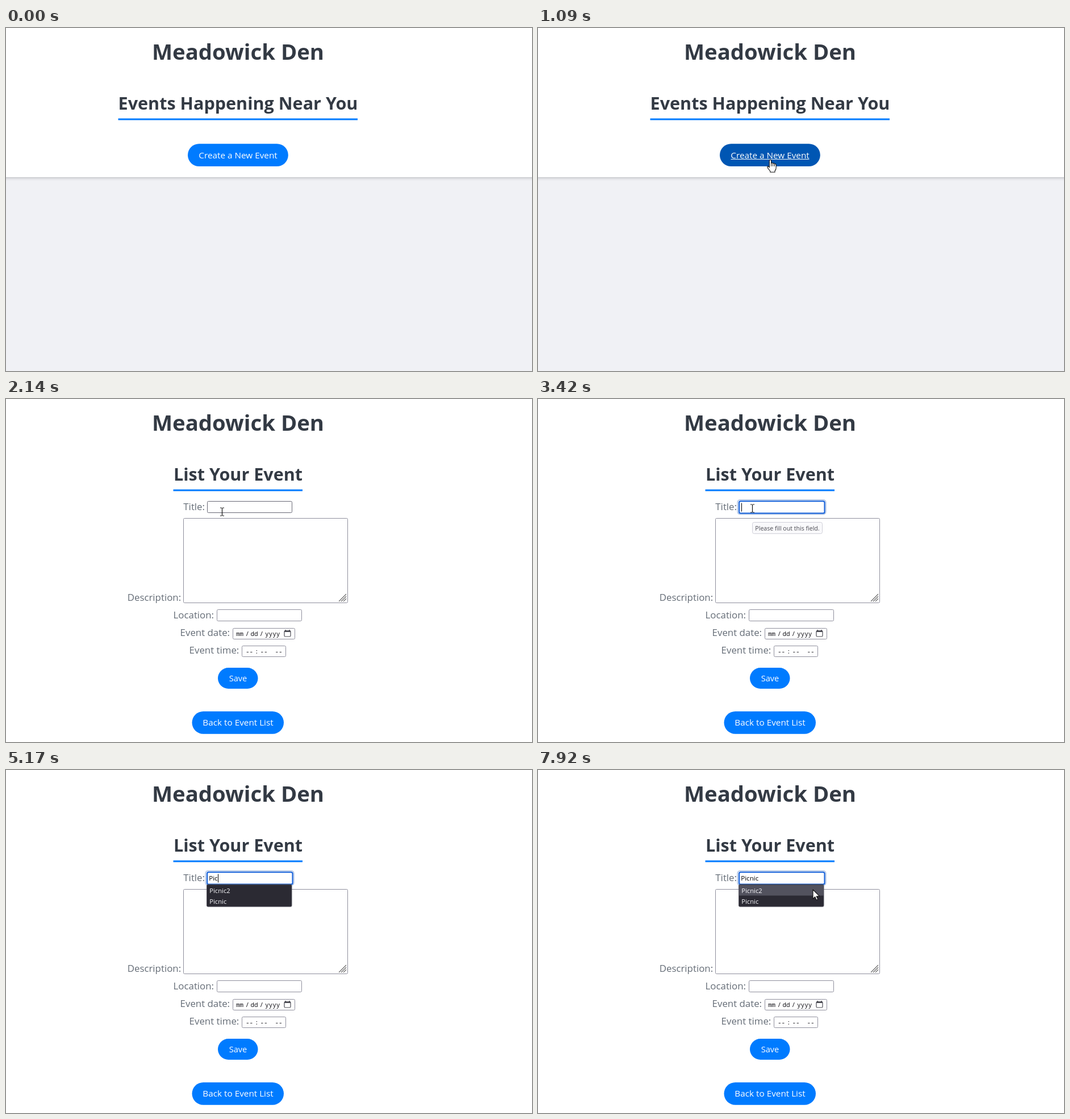
Recreate the animation shown at these times as an HTML page with a canvas. Size 926x605 px, loop 7.99 s.

```html
<!DOCTYPE html>
<html lang="en">
<head>
<meta charset="utf-8">
<title>Event form</title>
<style>
  html, body { margin: 0; width: 100%; height: 100%; overflow: hidden; background: #fff; }
  canvas { display: block; width: 926px; height: 605px; }
</style>
</head>
<body>
<canvas id="stage" width="926" height="605"></canvas>
<script>
const ctx = document.getElementById('stage').getContext('2d');
const LOOP = 7990;
const CENTER = 408.5;
const SANS = '"Open Sans", "Noto Sans", sans-serif';
const MONO = '"Noto Sans Mono", "DejaVu Sans Mono", monospace';
const BLUE = [0, 123, 255];
const BLUE_HOVER = [0, 86, 179];
const BORDER = '#8f8f9d';
const BORDER_HOVER = '#676774';

// Pointer routes: [ms, x, y] of the hot spot
const ENTER = [[110, 886, 588], [250, 770, 492], [390, 625, 385], [530, 505, 300], [670, 421, 246], [740, 412, 237], [880, 409, 232]];
const TO_TITLE = [[1810, 409, 232], [1940, 398, 219], [2140, 380, 198.5], [2670, 380, 198.5], [2870, 377, 193]];
const TO_LIST = [[7240, 379, 190], [7380, 418, 160], [7510, 462, 146], [7640, 500, 166], [7780, 498, 208], [7920, 484, 211]];

// Title field contents: [ms, text]
const TYPED = [[4720, 'P'], [4920, 'Pi'], [5100, 'Pic'], [5630, 'Picn'], [6030, 'Picni'], [6160, 'Picnic']];

const mix = (a, b, k) => a + (b - a) * k;
const clamp = v => Math.max(0, Math.min(1, v));
const smooth = k => k * k * (3 - 2 * k);
const rgb = (a, b, k) => `rgb(${a.map((v, i) => Math.round(mix(v, b[i], k)))})`;

function along(route, t) {
  if (t <= route[0][0]) return route[0].slice(1);
  for (let i = 1; i < route.length; i++) {
    const [t0, x0, y0] = route[i - 1], [t1, x1, y1] = route[i];
    if (t < t1) {
      const k = (t - t0) / (t1 - t0);
      return [mix(x0, x1, k), mix(y0, y1, k)];
    }
  }
  return route[route.length - 1].slice(1);
}

function text(str, x, y, size, color, { weight = 400, align = 'left', font = SANS } = {}) {
  ctx.font = `${weight} ${size}px ${font}`;
  ctx.textAlign = align;
  ctx.fillStyle = color;
  ctx.fillText(str, x, y);
}

function rect(x, y, w, h, color) {
  ctx.fillStyle = color;
  ctx.fillRect(x, y, w, h);
}

function rounded(x, y, w, h, r, fill, stroke, line = 1) {
  ctx.beginPath();
  ctx.roundRect(x, y, w, h, r);
  if (fill) { ctx.fillStyle = fill; ctx.fill(); }
  if (stroke) { ctx.strokeStyle = stroke; ctx.lineWidth = line; ctx.stroke(); }
}

function lines(color, width, ...segments) {
  ctx.beginPath();
  for (const [x0, y0, x1, y1] of segments) { ctx.moveTo(x0, y0); ctx.lineTo(x1, y1); }
  ctx.strokeStyle = color;
  ctx.lineWidth = width;
  ctx.stroke();
}

const field = (x, y, w, h, color = BORDER) => rounded(x + .5, y + .5, w - 1, h - 1, 2, '#fff', color);

function panel(bottom) {
  rect(0, 0, 926, 605, '#f0f1f5');
  ctx.save();
  ctx.shadowColor = 'rgba(0,0,0,.2)';
  ctx.shadowBlur = 5;
  ctx.shadowOffsetY = 2;
  rect(-10, -10, 946, bottom + 10, '#fff');
  ctx.restore();
}

function headings(sub) {
  const style = { weight: 700, align: 'center' };
  text('Meadowick Den', CENTER, 56, 38.3, '#333a44', style);
  text(sub, CENTER, 144, 30.55, '#333a44', style);
}

function listPage(t) {
  panel(263);
  headings('Events Happening Near You');
  rect(197.5, 159.5, 421.5, 3, rgb(BLUE, BLUE, 0));
  const hover = t >= 670;
  const k = hover ? 1 - Math.pow(1 - clamp((t - 655) / 300), 1.5) : 0;
  rounded(320, 204.3, 176.8, 39.7, 20, rgb(BLUE, BLUE_HOVER, k));
  text('Create a New Event', CENTER, 229.7, 15.3, '#fff', { align: 'center' });
  if (hover) rect(339.5, 231, 138, 1, '#fff');
}

function dateField(x, y) {
  field(x, y, 110, 20);
  const put = (str, dx) => text(str, x + dx, y + 14, 11, '#15141a', { font: MONO });
  [['mm', 6], ['/', 22.5], ['dd', 31.5], ['/', 47.5], ['yyyy', 57]].forEach(part => put(...part));
  rounded(x + 91, y + 5, 11, 10, 1.5, null, '#4a4a52', 1.2);
  rect(x + 91, y + 4.5, 11, 2.5, '#4a4a52');
  rect(x + 92.5, y + 3, 1.6, 2, '#4a4a52');
  rect(x + 99, y + 3, 1.6, 2, '#4a4a52');
}

function timeField(x, y) {
  field(x, y, 78, 20);
  [['--', 7], [':', 23], ['--', 32.5], ['--', 58.5]].forEach(([str, dx]) =>
    text(str, x + dx, y + 14, 11, '#15141a', { font: MONO }));
}

function textArea(x, y, color) {
  field(x, y, 290, 150, color);
  const right = x + 287, low = y + 147;
  lines('#666', 1.1, ...[13, 9, 5].map(d => [right - d, low, right, low - d]));
}

function saveButton(y) {
  rounded(373, y, 70.5, 37, 18.5, rgb(BLUE, BLUE, 0));
  text('Save', CENTER, y + 24, 14.6, '#fff', { align: 'center' });
}

function loadingPage() {
  panel(580);
  rect(298, 146, 220.5, 3, rgb(BLUE, BLUE, 0));
  field(353, 165, 150, 21);
  textArea(309.5, 194.5, BORDER_HOVER);
  field(369.5, 354, 150, 21);
  dateField(398, 384);
  timeField(413, 413);
  saveButton(452);
  rounded(328.5, 525, 159.5, 36, 18, rgb(BLUE, BLUE, 0));
}

function titleField(t) {
  const focused = t >= 3420;
  if (!focused) {
    field(354, 180, 150, 21, t >= 2100 ? BORDER_HOVER : BORDER);
    return;
  }
  rounded(351.3, 177.8, 155.4, 25.4, 4.5, '#fff', '#a9bfe2', 1.6);
  rounded(354, 180.2, 150.5, 21.2, 2.5, '#fff', '#0c5bd8', 2);
  let value = '';
  for (const [at, str] of TYPED) if (t >= at) value = str;
  text(value, 357.2, 195, 11.6, '#000');
  const caretOff = (t >= 3940 && t < 4530) || (t >= 6640 && t < 7240) || t >= 7780;
  if (!caretOff) rect(Math.round(357.5 + ctx.measureText(value).width), 183.5, 1, 15, '#000');
}

function suggestions(t, pointer) {
  if (t < 4850) return;
  ctx.save();
  ctx.globalAlpha = clamp((t - 4790) / 180);
  rounded(353.5, 202, 149.5, 39, 2, '#2b2a33', '#55545e', 1);
  if (pointer && pointer[1] > 203 && pointer[1] < 222) rect(354, 203, 149, 18.5, '#52525e');
  text('Picnic2', 358.3, 216.5, 11.2, '#fbfbfe');
  text('Picnic', 358.3, 235.5, 11.2, '#fbfbfe');
  ctx.restore();
}

function tooltip(t) {
  if (t < 2670 || t >= 4720) return;
  ctx.save();
  ctx.globalAlpha = clamp((t - 2600) / 250);
  rounded(377.5, 217.5, 123, 20, 3, '#f9f9fb', '#cfcfd8');
  text('Please fill out this field.', 439, 231.5, 10.6, '#4a4a52', { align: 'center' });
  ctx.restore();
}

function formPage(t, pointer) {
  rect(0, 0, 926, 605, '#fff');
  headings('List Your Event');
  rect(294.5, 159.5, 227.5, 3, rgb(BLUE, BLUE, 0));
  const label = (str, x, y) => text(str, x, y, 16.85, '#646c76');
  label('Title:', 312.3, 195.5);
  label('Description:', 213.7, 356);
  label('Location:', 294.6, 386.7);
  label('Event date:', 306.6, 418);
  label('Event time:', 322.6, 449.3);
  textArea(312, 210, t < 2010 ? BORDER_HOVER : BORDER);
  field(371, 371, 150, 21);
  dateField(399, 404);
  timeField(415, 435);
  saveButton(474);
  rounded(327.5, 551, 161.5, 39.7, 20, rgb(BLUE, BLUE, 0));
  text('Back to Event List', CENTER, 576.3, 15.3, '#fff', { align: 'center' });
  titleField(t);
  tooltip(t);
  suggestions(t, pointer);
}

function outline(x, y, path) {
  ctx.save();
  ctx.translate(x, y);
  const shape = new Path2D(path);
  ctx.lineJoin = 'round';
  ctx.lineWidth = 1.1;
  ctx.fillStyle = '#fff';
  ctx.strokeStyle = '#111';
  ctx.fill(shape);
  ctx.stroke(shape);
  ctx.restore();
}

function arrow([x, y]) {
  outline(x, y, 'M0 0V16.2L3.7 12.7L6.1 18.2L8.6 17.1L6.2 11.7H11.4Z');
}

function hand([x, y]) {
  outline(x, y, 'M-1.7 14V2Q-1.7 .4 0 .4Q1.6 .4 1.6 2V8V6.4Q3.2 5 4.6 6.6V8.2V7.2Q6.2 5.8 7.5 7.4V9V8.2Q9.2 7 10.2 8.8V14Q10.2 18 8 20V22.2H-.2V20.5L-5 14.4Q-5.8 12.6-4.6 11.9Q-3.4 11.6-1.7 14Z');
  lines('#111', 1, [x + 1.6, y + 7, x + 1.6, y + 12], [x + 4.6, y + 8, x + 4.6, y + 12], [x + 7.5, y + 9, x + 7.5, y + 12]);
}

function beam([x, y]) {
  const cx = Math.round(x) + .5, cy = Math.round(y);
  lines('#111', 1.2, [cx, cy - 7, cx, cy + 7],
    [cx - 3.5, cy - 7, cx - .8, cy - 7], [cx + .8, cy - 7, cx + 3.5, cy - 7],
    [cx - 3.5, cy + 7, cx - .8, cy + 7], [cx + .8, cy + 7, cx + 3.5, cy + 7]);
}

function draw(t) {
  if (t < 1350) {
    listPage(t);
    if (t >= 110) (t < 670 ? arrow : hand)(along(ENTER, t));
  } else if (t < 1480) {
    loadingPage();
    beam([408.6, 232]);
  } else {
    const pointer = t < 4720 ? along(TO_TITLE, t) : t >= 7240 ? along(TO_LIST, t) : null;
    formPage(t, pointer);
    if (pointer) {
      const overTitle = pointer[1] > 180 && pointer[1] < 201 && pointer[0] < 504;
      (t < 4720 || overTitle ? beam : arrow)(pointer);
    }
  }
}

const start = performance.now();
function tick() {
  draw((performance.now() - start) % LOOP);
  requestAnimationFrame(tick);
}
tick();
</script>
</body>
</html>
```
